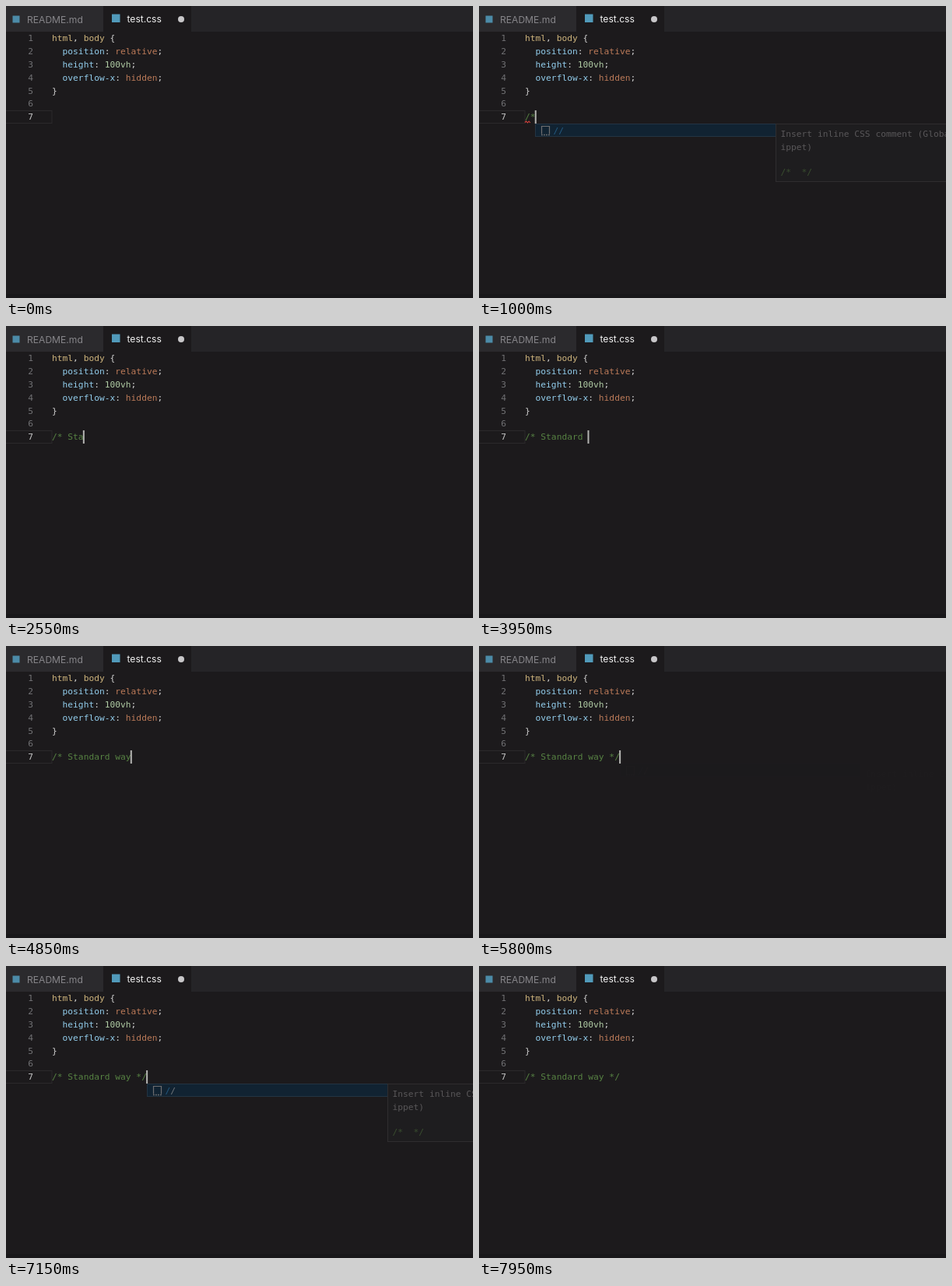
Recreate the animation shown at these times as an HTML page. Size 600 by 375 pixels, loop 8 s.

```html
<!DOCTYPE html>
<html lang="en">
<head>
<meta charset="utf-8">
<title>Typing a CSS comment</title>
<style>
  html, body { margin: 0; width: 100%; height: 100%; overflow: hidden; background: #1c1a1c; }
  svg { display: block; width: 100vw; height: 100vh; }
  text { font: 11.25px "DejaVu Sans Mono", monospace; white-space: pre; fill: #d0d0d0; }
  .tab { font: 12.1px Inter, sans-serif; fill: #87868a; }
  .active { fill: #f4f4f4; }
  .num { text-anchor: end; fill: #717174; }
  .num.current { fill: #c4c4c4; }
  .sel { fill: #cfb57d; }
  .prop { fill: #92cdec; }
  .val { fill: #bd7b59; }
  .unit { fill: #b0cba4; }
  .comment { fill: #578343; }
  .doc { fill: #969597; }
  .match { fill: #2c9be8; }
</style>
</head>
<body>
<svg viewBox="0 0 600 375">
  <rect width="600" height="375" fill="#1c1a1c"/>
  <rect width="600" height="33" fill="#252427"/>
  <rect width="125" height="33" fill="#2b2a2d"/>
  <rect x="125" width="113" height="33" fill="#1c1a1c"/>
  <rect y="370" width="600" height="5" fill="#181719"/>
  <rect x="8.5" y="12.5" width="9" height="9" fill="#4c8ba8"/>
  <rect x="136" y="10.5" width="10.5" height="10.5" fill="#519aba"/>
  <text class="tab" x="27" y="21.5">README.md</text>
  <text class="tab active" x="155.5" y="21">test.css</text>
  <circle cx="225" cy="17" r="4" fill="#c8c7c9"/>
  <rect x="-1" y="134.5" width="60" height="16" fill="none" stroke="#2b292b"/>

  <g id="code"></g>
  <text id="typed" x="59" y="146.2"></text>
  <path id="squiggle" d="M59 149.5l1.7-1.5 1.7 2 1.7-2 1.7 2" fill="none" stroke="#e0443e" stroke-width="1.1"/>
  <rect id="caret" y="134" width="2" height="17" fill="#b4b4b2"/>

  <g id="popup">
    <rect x=".5" y="151.5" width="309.5" height="16" fill="#062d49" stroke="#2b506b"/>
    <path d="M8.5 164.5v-10h10v10" fill="none" stroke="#c5c5c5" stroke-width="1.2"/>
    <path d="M8 165.5h11" stroke="#c5c5c5" stroke-width="1.3" stroke-dasharray="1.8 1.2"/>
    <text class="match" x="23.5" y="164">/<tspan id="slash">/</tspan></text>
    <rect x="309.5" y="151.5" width="330" height="74" fill="#222123" stroke="#434143"/>
    <text class="doc" x="315.5" y="168">Insert inline CSS comment (Global User Sn</text>
    <text class="doc" x="315.5" y="184.8">ippet)</text>
    <text class="comment" x="315.5" y="217">/*  */</text>
  </g>
</svg>
<script>
const LOOP = 8000, LEFT = 59, ADVANCE = 6.773, FIRST_LINE = 45.3, LINE = 16.82;
const comment = "/* Standard way */";
const keyTimes = [450, 900, 1600, 1950, 2150, 2400, 2650, 2850, 3050,
                  3250, 3450, 3700, 4150, 4400, 4600, 5000, 5450, 5750];
const byId = id => document.getElementById(id);
const [code, typed, squiggle, caret, popup, slash] =
  ["code", "typed", "squiggle", "caret", "popup", "slash"].map(byId);

const span = (kind, text) => `<tspan class="${kind}">${text}</tspan>`;
const rule = (name, value, kind = "val") =>
  `  ${span("prop", name)}: ${span(kind, value)};`;
const lines = [
  `${span("sel", "html")}, ${span("sel", "body")} {`,
  rule("position", "relative"),
  rule("height", "100vh", "unit"),
  rule("overflow-x", "hidden"),
  "}", "", ""
];
code.innerHTML = lines.map((line, i) => {
  const y = FIRST_LINE + i * LINE;
  return `<text class="num${i === 6 ? " current" : ""}" x="35" y="${y}">${i + 1}</text>
    <text x="${LEFT}" y="${y}">${line}</text>`;
}).join("");

const ramp = (t, start, end) => Math.min(1, Math.max(0, (t - start) / (end - start)));
const show = (node, visible) => node.setAttribute("opacity", Number(visible));

function draw(t) {
  const count = keyTimes.filter(k => k <= t).length;
  const caretX = LEFT + count * ADVANCE;
  typed.textContent = comment.slice(0, count);
  typed.setAttribute("class", count > 1 ? "comment" : "");

  // The caret stays lit after a key, then blinks.
  const lastKey = count ? keyTimes[count - 1] : -700;
  caret.setAttribute("x", caretX - 0.8);
  show(caret, (t - lastKey) % 1200 < 600);
  show(squiggle, t >= 600 && t < 1150);

  const first = ramp(t, 550, 650) - ramp(t, 900, 1100);
  const second = ramp(t, 5800, 5900) - ramp(t, 7100, 7200);
  popup.setAttribute("transform", `translate(${Math.round(caretX - 0.4)} 0)`);
  show(popup, first + second);
  slash.style.fill = t < 2000 ? "" : "#c9d3da";
}

function frame(now) {
  draw(now % LOOP);
  requestAnimationFrame(frame);
}
requestAnimationFrame(frame);
</script>
</body>
</html>
```
